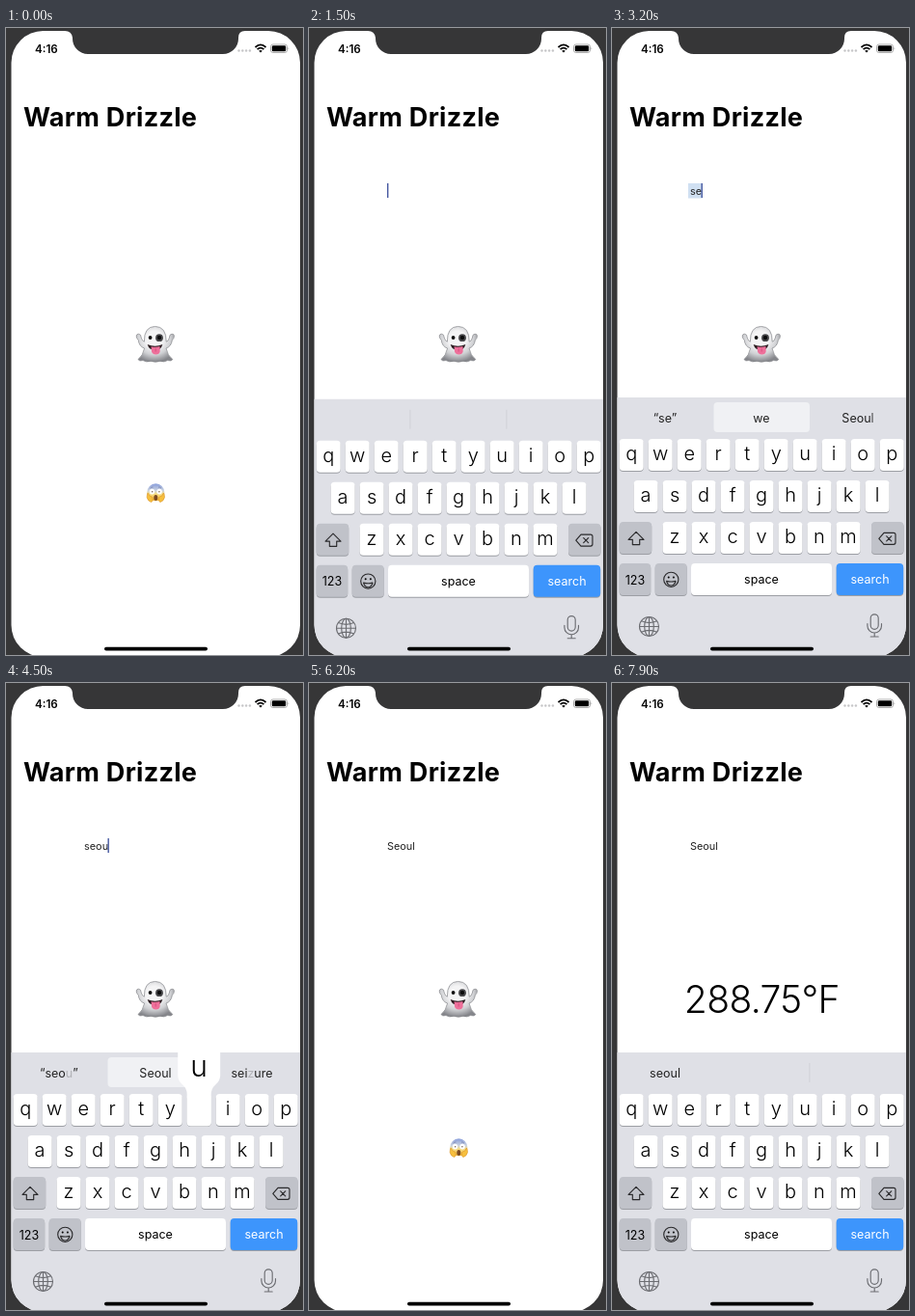
An HTML page for the animation above (8000 ms loop, 308x650 px).

```html
<!DOCTYPE html>
<html lang="en">
<head>
<meta charset="utf-8">
<title>Warm Drizzle</title>
<style>
html, body { margin: 0; width: 100%; height: 100%; overflow: hidden; background: #363637; }
svg { display: block; width: 100vw; height: 100vh; }
text { font-family: Inter, "Liberation Sans", sans-serif; white-space: pre; }
.mid { text-anchor: middle; }
.letter { font-size: 20px; font-weight: 350; }
.label { font-size: 12.5px; }
.line { fill: none; stroke: #2a2a2c; stroke-width: 1.15; stroke-linejoin: round; stroke-linecap: round; }
.thin { fill: none; stroke: #6c6d72; stroke-width: 1.15; stroke-linecap: round; }
</style>
</head>
<body>
<svg viewBox="0 0 308 650" preserveAspectRatio="none">
  <defs>
    <clipPath id="screen">
      <path d="M5.5 36A33 33 0 0 1 38.5 3H61Q68 3 69 10V11A16 16 0 0 0 85 27H225A16 16 0 0 0 241 11V10Q241 3 248 3H272A33 33 0 0 1 305 36V619A33 33 0 0 1 272 652H38.5A33 33 0 0 1 5.5 619Z"/>
    </clipPath>
    <radialGradient id="sheet" cx=".47" cy=".36" r=".64">
      <stop offset=".35" stop-color="#f4f4f5"/><stop offset=".68" stop-color="#d0d1d4"/><stop offset="1" stop-color="#85868b"/>
    </radialGradient>
    <linearGradient id="fear" x2="0" y2="1">
      <stop offset=".05" stop-color="#8fa3dc"/><stop offset=".4" stop-color="#cbd3e0"/><stop offset=".6" stop-color="#f6dd83"/><stop offset="1" stop-color="#f2b637"/>
    </linearGradient>
  </defs>
  <g clip-path="url(#screen)">
    <rect width="308" height="650" fill="#fff"/>
    <text x="30" y="25.5" font-size="11.6" font-weight="600">4:16</text>
    <g fill="#c6c6c8">
      <circle cx="241.5" cy="23.5" r="1.2"/><circle cx="245.3" cy="23.5" r="1.2"/><circle cx="249.1" cy="23.5" r="1.2"/><circle cx="252.9" cy="23.5" r="1.2"/>
    </g>
    <g fill="none" stroke="#000" stroke-width="1.8">
      <path d="M258.5 20Q264 14.8 269.5 20"/><path d="M260.6 22.2Q264 19 267.4 22.2"/>
    </g>
    <path d="M262.2 23.7Q264 22.2 265.8 23.7L264 25.6Z"/>
    <rect x="274.5" y="17" width="17" height="8.5" rx="2.4" fill="#fff" stroke="#999" stroke-width=".8"/>
    <rect x="275.8" y="18.2" width="14.4" height="6.1" rx="1.4"/>
    <path d="M292.6 19.8Q294 21.2 292.6 22.7Z" fill="#888"/>
    <text x="18" y="102" font-size="27" font-weight="700" letter-spacing=".3">Warm Drizzle</text>

    <rect id="mark" x="79" y="161" width="15" height="15.5" fill="#d0e0f2"/>
    <text id="field" x="81" y="172.5" font-size="10.9" fill="#222"></text>
    <rect id="caret" y="161" width="1.4" height="15" fill="#4658a0"/>

    <g id="before">
      <path d="M143.6 332Q138.2 330.5 137.2 323.5Q135 321.5 135.2 319Q135.6 317 137.6 317.2Q140.2 317.4 140.2 321Q141.4 325 143.4 325.2Q143 309.6 154.6 309.4Q166.4 309.6 166.2 325.2Q168.4 325 169.4 321Q169.4 317.4 172 317.2Q174.2 317 174.4 319Q174.6 321.5 172.4 323.5Q171.2 330.5 166 332Q167.4 339.5 172.8 343.6Q171.8 345.8 167.5 344.6Q164 346.8 160 345.4Q155 347 150 345.4Q145.5 346.8 142 344.6Q138.2 345.8 137 343.6Q142.2 339.5 143.6 332Z" fill="url(#sheet)" stroke="#85868a" stroke-width=".7"/>
      <ellipse cx="149.6" cy="321" rx="1.9" ry="2.1" fill="#111"/>
      <circle cx="159" cy="321.2" r="3.9" fill="#47474a"/>
      <circle cx="159" cy="321" r="2.2" fill="#0c0c0d"/>
      <path d="M146.6 328Q154.5 331.3 162.4 328Q160.8 333.8 154.5 334Q148.4 333.8 146.6 328Z" fill="#2a1a1f"/>
      <path d="M150.6 330.2Q155 331.5 159.5 330.1L159.7 335.3Q158.9 338.6 155.4 338.5Q151.6 338.2 150.9 335Z" fill="#ee6f9a"/>
      <path d="M155.2 331.8V335.5" stroke="#cf4778" stroke-width=".7"/>

      <circle cx="155.3" cy="481.3" r="9" fill="url(#fear)"/>
      <path d="M149.5 477.2Q150.7 475.7 152.5 476M161 477.2Q159.8 475.7 158 476" fill="none" stroke="#6b76a5" stroke-width=".7"/>
      <ellipse cx="151.5" cy="480.6" rx="2.7" ry="2.9" fill="#fff"/><ellipse cx="159.1" cy="480.6" rx="2.7" ry="2.9" fill="#fff"/>
      <circle cx="151.7" cy="480.8" r=".7" fill="#6a5343"/><circle cx="158.9" cy="480.8" r=".7" fill="#6a5343"/>
      <ellipse cx="155.3" cy="487" rx="2" ry="3" fill="#7c4a22"/>
      <path d="M146.6 482.4Q148 481.8 148.4 484.5L152.1 486.6Q153 491 150.6 491.6Q147 490.5 146.1 486.5ZM164 482.4Q162.6 481.8 162.2 484.5L158.5 486.6Q157.6 491 160 491.6Q163.6 490.5 164.5 486.5Z" fill="#f6bf3d" stroke="#d8922a" stroke-width=".6"/>
    </g>
    <text id="after" x="74.8" y="342" font-size="39" font-weight="350" letter-spacing="-.6">288.75°F</text>

    <g id="board">
      <rect x="0" y="383" width="308" height="290" fill="#dfe0e6"/>
      <rect id="pill" x="105.5" y="388" width="99.5" height="31" rx="4" fill="#f0f1f4"/>
      <rect class="sep" x="104.5" y="394" width=".8" height="20" fill="#cdced4"/>
      <rect class="sep" x="204.5" y="394" width=".8" height="20" fill="#cdced4"/>
      <g id="hints"></g>
      <g id="keys"></g>
      <g class="line">
        <path d="M25 522.4L33 530.3H28.7V535.6H21.3V530.3H17Z"/>
        <path d="M276.8 529.3L282 523.3H292Q294 523.3 294 525.3V533.3Q294 535.3 292 535.3H282ZM284.7 526.8L289.7 531.8M289.7 526.8L284.7 531.8"/>
        <circle cx="61.3" cy="571.8" r="7.6"/>
        <path d="M56.6 573.4Q61.3 574.6 66 573.4Q65 578 61.3 578Q57.6 578 56.6 573.4Z"/>
      </g>
      <circle cx="58.7" cy="569.4" r="1"/><circle cx="63.9" cy="569.4" r="1"/>
      <g class="thin">
        <circle cx="38.5" cy="620.5" r="10"/><ellipse cx="38.5" cy="620.5" rx="4.8" ry="10"/>
        <path d="M38.5 610.5V630.5M28.5 620.5H48.5M30.5 614.8Q38.5 618.3 46.5 614.8M30.5 626.2Q38.5 622.7 46.5 626.2"/>
        <rect x="268.2" y="607.8" width="8" height="15.5" rx="4"/>
        <path d="M264.9 617.5V619.7A7.3 7.3 0 0 0 279.5 619.7V617.5M272.2 627V631M268.2 631H276.2"/>
      </g>
      <g id="pop">
        <path d="M-17 -66H17Q22 -66 22 -61V-36Q22 -30 17 -26Q12.5 -22 12.5 -16V13Q12.5 17 8.5 17H-8.5Q-12.5 17 -12.5 13V-16Q-12.5 -22 -17 -26Q-22 -30 -22 -36V-61Q-22 -66 -17 -66Z" fill="#fff"/>
        <text class="mid" id="popText" y="-35" font-size="30" font-weight="350"></text>
      </g>
    </g>
    <rect x="102" y="641.7" width="107" height="3.8" rx="1.9"/>
  </g>
</svg>
<script>
const LOOP = 8000, STEP = 100, TRAVEL = 267;
const $ = id => document.getElementById(id);

function add(parent, tag, attrs, text) {
  const el = document.createElementNS('http://www.w3.org/2000/svg', tag);
  for (const k in attrs) el.setAttribute(k, attrs[k]);
  if (text) el.textContent = text;
  parent.append(el);
  return el;
}

// Keyboard layout
const centers = {};
function key(x, y, w, fill) {
  add($('keys'), 'rect', { x, y: y + 1, width: w, height: 33, rx: 4, fill: '#9c9ea4' });
  add($('keys'), 'rect', { x, y, width: w, height: 33, rx: 4, fill });
}
function label(x, y, text, cls, fill = '#000') {
  add($('keys'), 'text', { x, y, class: 'mid ' + cls, fill }, text);
}
[['qwertyuiop', 7.7], ['asdfghjkl', 22.6], ['zxcvbnm', 52.5]].forEach(([row, left], r) => {
  const y = 426 + r * 43;
  [...row].forEach((c, i) => {
    const x = left + i * 30;
    key(x, y, 25, '#fff');
    label(x + 12.5, y + 22.1, c, 'letter');
    centers[c] = [x + 12.5, y + 16.5];
  });
});
const GREY = '#c0c2c9';
key(7.7, 512, 33.5, GREY);
key(269, 512, 33.5, GREY);
key(7.7, 555, 32.5, GREY);
key(44.7, 555, 33, GREY);
key(82, 555, 146, '#fff');
key(232.7, 555, 69.5, '#3d95fc');
label(24, 576.5, '123', 'label');
label(155, 576, 'space', 'label');
label(267.5, 576, 'search', 'label', '#fff');

// Timelines: [start, values...]
const typed = [[0, ''], [2400, 's'], [2900, 'se'], [3800, 'seo'], [4400, 'seou'], [5100, 'seoul'], [5700, 'Seoul']];
const hints = [
  [0, ['', '', ''], 0],
  [2500, ['“s”', '', ''], 0],
  [3000, ['“se”', 'we', 'Seoul'], 1],
  [3900, ['“seo”', 'Seoul', 'issuer'], 1],
  [4470, ['“seou”', 'Seoul', 'seizure'], 1],
  [5200, ['“seoul”', 'Seoul', ''], 1],
  [5700, ['“seoul”', 'Seoul', ''], 0],
  [6500, ['', '', ''], 0],
  [7200, ['seoul', '', ''], 0]
];
const presses = [[2400, 's'], [2900, 'e'], [3800, 'o'], [4400, 'u'], [5100, 'l']];
const carets = [[0, 0], [1100, 1], [2000, .4], [2100, 0], [2400, 1], [5700, 0], [7200, 1], [7800, .4], [7900, 0]];
const drop = [[5700, 0], [5800, 2.5], [5900, 97], [6000, 200], [6100, 250], [6200, 275]];

const indexAt = (list, t) => list.findLastIndex(row => row[0] <= t);
const clamp = v => Math.max(0, Math.min(1, v));

// Critically damped rise: distance still to go
function rise(ms) {
  if (ms <= 0) return TRAVEL + 8;
  const a = .01826 * ms;
  return TRAVEL * (1 + a) * Math.exp(-a);
}
function boardShift(t) {
  if (t < 5700) return t < 1900 ? rise(t - 1110) : 0;
  if (t >= 6200) return rise(t - 7163);
  const i = indexAt(drop, t), [t0, a] = drop[i], [t1, b] = drop[i + 1];
  return a + (b - a) * (t - t0) / (t1 - t0);
}

// New letters of a suggestion fade in one after another
function drawHints(t) {
  const i = indexAt(hints, t), [start, words, pill] = hints[i];
  const old = i ? hints[i - 1][1] : words;
  $('hints').replaceChildren();
  words.forEach((word, n) => {
    const text = add($('hints'), 'text', { x: 55 + 100 * n, y: 408.5, class: 'mid label', fill: '#222' });
    let fresh = 0;
    for (const c of word) {
      const alpha = old[n].includes(c) ? 1 : clamp((t - start) / 125 - fresh++ * .2);
      add(text, 'tspan', { 'fill-opacity': alpha }, c);
    }
  });
  $('pill').style.opacity = pill;
  const seps = document.querySelectorAll('.sep');
  seps[0].style.opacity = pill || t >= 7500 ? 0 : 1;
  seps[1].style.opacity = 1 - pill;
}

function render(t) {
  const word = typed[indexAt(typed, t)][1];
  $('field').textContent = word;
  $('caret').setAttribute('x', 81 + (word ? $('field').getComputedTextLength() - .6 : 0));
  $('caret').style.opacity = carets[indexAt(carets, t)][1];
  $('mark').style.opacity = t >= 3000 && t < 3800 ? 1 : 0;
  $('before').style.display = t < 6400 ? '' : 'none';
  $('after').style.display = t < 6400 ? 'none' : '';
  $('board').setAttribute('transform', `translate(0 ${boardShift(t).toFixed(2)})`);
  drawHints(t);
  const press = presses.find(([s]) => t >= s && t < s + 200);
  $('pop').style.display = press ? '' : 'none';
  if (press) {
    $('popText').textContent = press[1];
    $('pop').setAttribute('transform', `translate(${centers[press[1]]})`);
  }
}

const begin = performance.now();
let shown = -1;
function tick() {
  const t = Math.floor((performance.now() - begin) % LOOP / STEP) * STEP;
  if (t !== shown) render(shown = t);
  requestAnimationFrame(tick);
}
tick();
</script>
</body>
</html>
```
